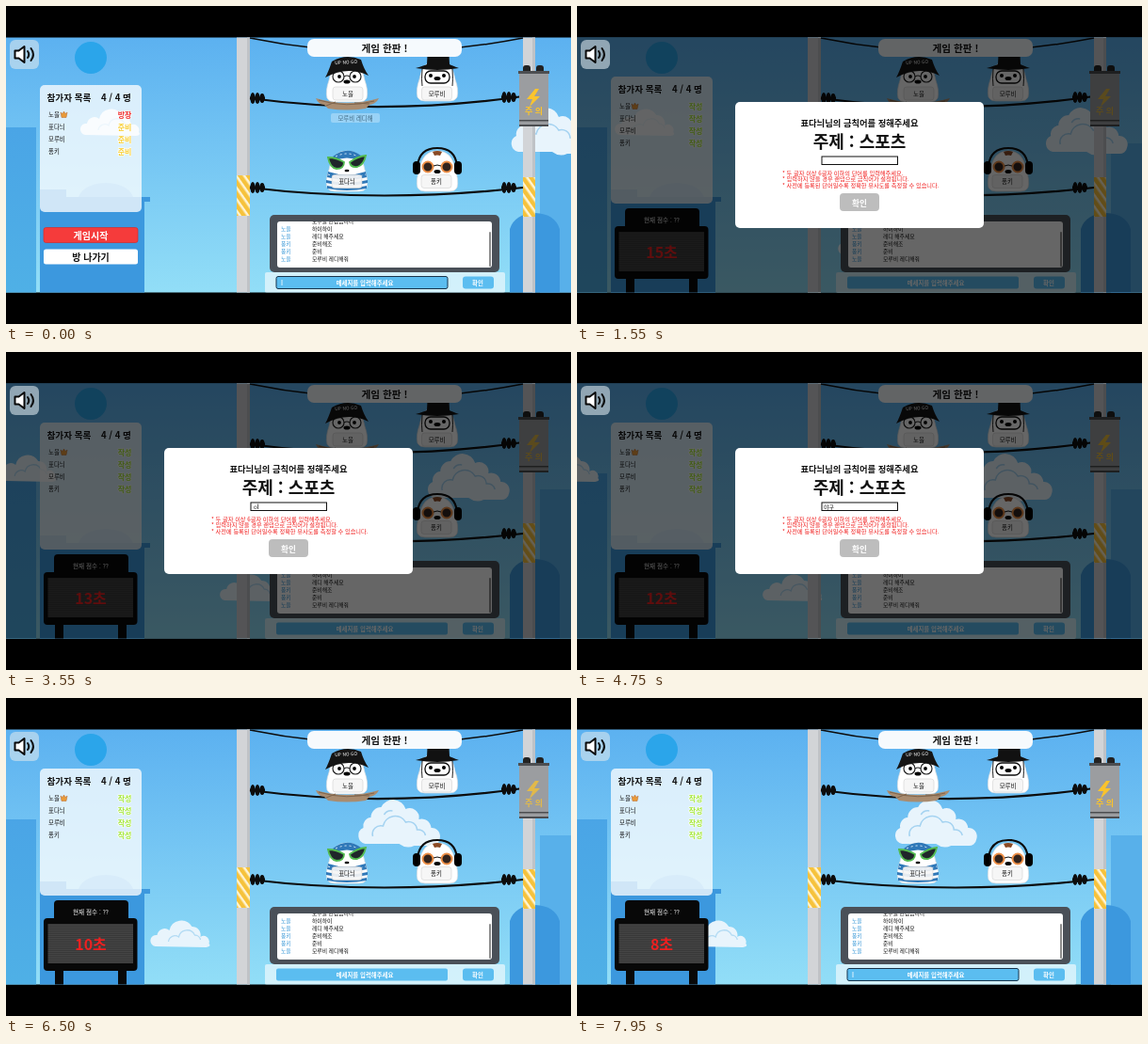
These frames come from a looping animation (600 by 338 pixels, 8000 ms). An HTML page:

```html
<!DOCTYPE html>
<html lang="ko">
<head>
<meta charset="utf-8">
<title>금칙어 게임</title>
<style>
html, body { margin: 0; width: 100%; height: 100%; overflow: hidden; background: #000; }
svg { display: block; width: 100vw; height: 100vh; }
text { font-family: "Noto Sans CJK KR", "Noto Sans CJK", "Noto Sans", sans-serif; font-size: 6.4px; font-weight: 500; fill: #111; dominant-baseline: central; white-space: pre; }
.mid { text-anchor: middle; }
.bold { font-weight: 900; }
.white { fill: #fff; }
.line { fill: none; stroke: #0c0c0c; }
.status { font-size: 8px; font-weight: 900; stroke: #fff; stroke-width: 1.2px; paint-order: stroke; }
.chat text { font-size: 5.8px; }
.chat .who { fill: #2f93d6; }
.note { font-size: 6.2px; fill: #f01818; }
.tag { fill: #f6f6f6; fill-opacity: .92; stroke: #d2d2d2; stroke-width: .6; }
</style>
</head>
<body>
<svg viewBox="0 0 600 338" preserveAspectRatio="none">
  <defs>
    <linearGradient id="sky" x2="0" y2="1">
      <stop stop-color="#5cb1f0"/><stop offset="1" stop-color="#92def7"/>
    </linearGradient>
    <linearGradient id="tower" gradientUnits="userSpaceOnUse" x1="0" x2="0" y1="130" y2="305">
      <stop stop-color="#4aa5e6"/><stop offset="1" stop-color="#4fb0e6"/>
    </linearGradient>
    <pattern id="hazard" width="7" height="7" patternUnits="userSpaceOnUse" patternTransform="rotate(-35)">
      <rect width="7" height="7" fill="#fff4d4"/><rect width="4.5" height="7" fill="#f6c23c"/>
    </pattern>
    <pattern id="scan" width="3" height="2" patternUnits="userSpaceOnUse">
      <rect width="3" height="2" fill="#454545"/><rect width="3" height="1" fill="#383838"/>
    </pattern>
    <clipPath id="stage"><rect y="33.5" width="600" height="271"/></clipPath>
    <clipPath id="log"><rect x="288" y="229" width="228" height="49" rx="3"/></clipPath>
    <g id="bigCloud">
      <path fill="#e8f4fc" d="M-36 20a9 9 0 0 1-2-17a9 9 0 0 1 8-11a11 11 0 0 1 11-11a14 14 0 0 1 26 2a10 10 0 0 1 14 11a10 10 0 0 1 13 9a9 9 0 0 1 9 12a8 8 0 0 1-9 7h-18q-8 4-16-2z"/>
      <path fill="none" stroke="#a5d3f1" stroke-width="1.5" d="M-28 12a9 9 0 0 1 11-11a13 13 0 0 1 24-4a9 9 0 0 1 12 8a8 8 0 0 1 9 6M-16-11a9 9 0 0 1 9-4"/>
    </g>
    <g id="smallCloud">
      <path fill="#e8f4fc" d="M-29 14a6 6 0 0 1 2-12a8 8 0 0 1 13-5a13 13 0 0 1 24-4a9 9 0 0 1 9 11a6 6 0 0 1 9 7q3 3-3 4z"/>
      <path fill="none" stroke="#b3dbf4" stroke-width="1.3" d="M-15 9a7 7 0 0 1 11-5a9 9 0 0 1 17-2a6 6 0 0 1 6 5"/>
    </g>
    <g id="insulator" fill="#0c0c0c">
      <rect x="-8" y="-1.5" width="16" height="3"/>
      <ellipse cx="-5" rx="2.6" ry="6"/><ellipse rx="2.6" ry="6"/><ellipse cx="5" rx="2.6" ry="5"/>
    </g>
    <path id="body" d="M-21 22q-2-8 2-19q3-20 19-20t19 20q4 11 2 19q-2 4-8 4h-26q-6 0-8-4z" fill="#fff" stroke="#d8dde0" stroke-width=".7"/>
  </defs>

  <rect width="600" height="338"/>
  <g clip-path="url(#stage)">
    <rect y="33" width="600" height="272" fill="url(#sky)"/>
    <g fill="url(#tower)">
      <path d="M0 129h32v176H0z"/>
      <path fill="#58b0ea" d="M567 146h33v159h-33z"/>
      <path fill="#5db1e9" d="M76 207q3-18 30-19q27 1 30 19z"/>
      <path fill="#3c98de" d="M36 305V195h28v8h89v5h-6v97z"/>
      <path fill="#3c98de" d="M535 305v-68q5-16 27-17q21 1 26 17v68z"/>
    </g>
    <g id="clouds"></g>

    <g fill="#d2d4d7">
      <path d="M245 33h14v272h-14zM549 33h13v272h-13z"/>
      <path fill="#bfc2c6" d="M256 33h3v272h-3zM559 33h3v272h-3z"/>
      <path fill="url(#hazard)" d="M245 180h14v43h-14zM549 182h13v42h-13z"/>
    </g>
    <path class="line" stroke-width="1.5" d="M259 34Q400 63 549 34"/>
    <path class="line" stroke-width="2.2" d="M259 98Q400 117 549 96M259 193Q400 210 549 193"/>
    <use href="#insulator" x="267" y="98"/><use href="#insulator" x="534" y="97"/>
    <use href="#insulator" x="267" y="193"/><use href="#insulator" x="534" y="193"/>

    <g fill="#222">
      <rect x="549" y="63" width="8" height="9" rx="3"/><rect x="563" y="63" width="8" height="9" rx="3"/>
      <path fill="#9b9da0" d="M545 70h31v57h-31z"/>
      <path d="M544 69h33v3h-33zM545 121h31v1.500h-31zM545 126h31v2h-31z" fill="#4c4e51"/>
      <g id="warning" fill="#fbc42c">
        <path d="M562 88l-9 11h6l-3 8 11-11h-6l5-8z"/>
        <text class="mid bold" x="560.5" y="111" style="font-size:9px;fill:#fbc42c">주 의</text>
      </g>
    </g>

    <g transform="translate(362 76)">
      <use href="#body"/>
      <path fill="#a98c70" d="M-33 22q33 10 67 0q-3 6-10 7l-4 4q-20 3-40 0l-4-4q-7-1-9-7z"/>
      <path stroke="#7f654d" fill="none" d="M-30 24q30 9 59 1M-22 30l10-4M8 27l16 1"/>
      <g fill="#fff" stroke="#222" stroke-width="1.2"><circle cx="-9" cy="-1" r="6"/><circle cx="9" cy="-1" r="6"/><path d="M-3-1q3-2 6 0"/></g>
      <circle cx="-8" cy="-1" r="1.900"/><circle cx="8" cy="-1" r="1.900"/><ellipse cy="4.500" rx="3.500" ry="2"/>
      <path fill="#151515" d="M-23 0q3-5 7-17q15-9 31-2q3 10 8 17q-22-11-46 2z"/>
      <text class="mid white" y="-17" style="font-size:5px" transform="rotate(-3)">UP NO GO</text>
    </g>
    <g transform="translate(458 75)">
      <use href="#body"/>
      <rect class="line" x="-13" y="-6" width="26" height="13" rx="6" stroke-width="1.3"/>
      <circle cx="-7" cy="-1" r="2"/><circle cx="7" cy="-1" r="2"/><ellipse cy="2" rx="3.500" ry="2"/>
      <path fill="#111" d="M-23-9q10-3 12-4l1-20q10-3 22 0l1 20q2 1 10 4q-23 4-46 0z"/>
      <path class="line" stroke-width=".9" d="M-16-8q-1 12 0 18M16-8q1 12 0 18"/>
    </g>
    <g transform="translate(362 171)">
      <use href="#body"/>
      <path fill="#2f78b8" d="M-20 5q20 7 40 0l1 6q-21 6-42 0zM-22 14q22 5 44 0v3q-22 5-44 0zM-21 20q21 5 42 0v3q-21 4-42 0zM-15-11q15-12 30-1l-3 5q-12-5-24 0z"/>
      <path stroke="#dff1fb" fill="none" stroke-dasharray="2 3" d="M-20 8q20 7 40 0M-12-11q12-6 24 0"/>
      <g fill="#20262a" stroke="#53ba50" stroke-width="1.8">
        <path d="M-20-10q9 0 17 5q0 7-8 7q-7-1-9-12zM20-12q-9 1-17 7q1 6 8 5q7-2 9-12z"/>
      </g>
      <ellipse cy="3" rx="4" ry="2.4" fill="#fff"/><ellipse cy="4" rx="2.500" ry="1.3"/>
    </g>
    <g transform="translate(458 171)">
      <use href="#body"/>
      <path fill="#8a4a25" d="M-5-16q5-2 10 0l-2 4q-3-1-6 0z"/>
      <path class="line" stroke-width="2.2" d="M-21-1Q-19-20 0-20T21-1"/>
      <rect x="-26" y="-6" width="8" height="14" rx="4"/><rect x="18" y="-6" width="8" height="14" rx="4"/>
      <g fill="#33241d" stroke="#ef9149" stroke-width="2"><circle cx="-10" cy="0" r="5.500"/><circle cx="10" cy="0" r="5.500"/></g>
      <path class="line" d="M-4-1q4-2 8 0"/><ellipse cy="5" rx="3.500" ry="2"/>
    </g>
    <g id="tags"></g>
    <g id="bubble">
      <rect x="345" y="114" width="52" height="10" rx="2" fill="#fff" opacity=".6"/>
      <text class="mid" x="371" y="119">모루비 레디해</text>
    </g>

    <rect x="320" y="35" width="164" height="19" rx="7" fill="#f6fafd"/>
    <text class="mid bold" x="402" y="44.5" style="font-size:10.6px">게임 한판 !</text>

    <rect x="275" y="283" width="255" height="22" rx="2" fill="#fff" opacity=".6"/>
    <rect x="280" y="222" width="244" height="61" rx="5" fill="#4a5058"/>
    <rect x="288" y="229" width="228" height="49" rx="3" fill="#fff"/>
    <g class="chat" id="chat" clip-path="url(#log)"></g>
    <rect x="513" y="240" width="2" height="37" rx="1" fill="#8c8c8c"/>
    <rect id="field" x="287" y="287.5" width="182" height="13" rx="2" fill="#5bbdf0"/>
    <text class="mid white bold" x="381" y="294">메세지를 입력해주세요</text>
    <path id="chatCaret" d="M293 291v6" stroke="#fff" stroke-width=".8"/>
    <rect x="485" y="287.5" width="33" height="13" rx="3" fill="#5bbdf0"/>
    <text class="mid white bold" x="501" y="294">확인</text>

    <circle cx="90" cy="55" r="17" fill="#2ba5ea"/>

    <g id="roster">
      <rect x="36" y="84" width="108" height="135" rx="5" fill="#fff" opacity=".76"/>
      <text class="bold" x="43.5" y="97" style="font-size:9.6px">참가자 목록</text>
      <text class="bold" x="101" y="97" style="font-size:9.6px">4 / 4 명</text>
      <path fill="#e99a38" stroke="#b7672c" stroke-width=".5" d="M58 113l2 1.5 1.5-2.5 1.5 2.5 2-1.5-1 5.500h-5z"/>
    </g>
    <g id="lobby">
      <rect id="start" x="40" y="235.500" width="100" height="16" rx="2.500" stroke="#d42b2b" stroke-width=".7"/>
      <text class="mid white bold" x="90" y="243.5" style="font-size:10px">게임시작</text>
      <rect x="40" y="258.500" width="100" height="16" rx="2.5" fill="#fff"/>
      <text class="mid bold" x="90" y="266.500" style="font-size:10px">방 나가기</text>
    </g>
    <g id="board">
      <path fill="#080808" d="M52 285h9v20h-9zM119 285h9v20h-9z"/>
      <rect x="51" y="215" width="79" height="24" rx="4" fill="#080808"/>
      <rect x="40" y="234" width="99.500" height="56" rx="4" fill="#080808"/>
      <rect x="44.500" y="240" width="90.500" height="42" fill="url(#scan)"/>
      <text class="mid white" x="90" y="227" style="font-size:6.6px">현재 점수 : ??</text>
      <text class="mid bold" id="count" x="90" y="261" style="font-size:16px;fill:#ef2020"></text>
    </g>

    <rect id="dim" y="33" width="600" height="272" opacity=".6"/>
    <rect x="4" y="36" width="31" height="31" rx="6" fill="#d9e6ed" opacity=".6"/>
    <path fill="#fff" stroke="#080808" stroke-width="2" stroke-linejoin="round" d="M9.500 47.500h4l6-4.500v17l-6-4.500h-4z"/>
    <path class="line" stroke-width="2" stroke-linecap="round" d="M23 48q2.500 3.500 0 7M26.500 45q5 6.500 0 13"/>

    <g id="modal">
      <rect x="168" y="102" width="264" height="134" rx="5" fill="#fff"/>
      <text class="mid bold" x="300" y="124" style="font-size:9.3px">표다늬님의 금칙어를 정해주세요</text>
      <text class="mid bold" x="300" y="143" style="font-size:18px">주제 : 스포츠</text>
      <rect x="260" y="160" width="80.500" height="8.500" fill="#fff" stroke="#111"/>
      <text id="word" x="262" y="164.300" style="font-size:6px"></text>
      <path id="wordCaret" d="M0 161.500v5.500" stroke="#111" stroke-width=".7"/>
      <text class="note" x="218" y="177">* 두 글자 이상 6글자 이하의 단어를 입력해주세요.</text>
      <text class="note" x="218" y="183.5">* 입력하지 않을 경우 랜덤으로 금칙어가 설정됩니다.</text>
      <text class="note" x="218" y="190">* 사전에 등록된 단어일수록 정확한 유사도를 측정할 수 있습니다.</text>
      <rect x="279" y="199" width="42" height="19" rx="4" fill="#bdbdbd"/>
      <text class="mid white bold" x="300" y="208.500" style="font-size:8.600px">확인</text>
    </g>
  </g>
</svg>
<script>
const LOOP = 8000, GAME_START = 1300, COUNT_START = 850, MODAL_END = 5400;
const CLOUD_SPEED = 0.025;
const $ = id => document.getElementById(id);
const add = (parent, tag, attrs, text = '') => {
  const node = document.createElementNS('http://www.w3.org/2000/svg', tag);
  for (const key in attrs) node.setAttribute(key, attrs[key]);
  node.textContent = text;
  return parent.appendChild(node);
};
const show = (id, visible) => $(id).style.display = visible ? '' : 'none';

const players = ['노을', '표다늬', '모루비', '퐁키'];
const statuses = players.map((name, i) => {
  const y = 115 + i * 13.3;
  add($('roster'), 'text', { x: 45, y }, name);
  return add($('roster'), 'text', { x: 126, y, class: 'mid status' });
});

[[363, 93, 0], [457.5, 93, 2], [362, 186.5, 1], [457, 186.5, 3]].forEach(([x, y, i]) => {
  add($('tags'), 'rect', { x: x - 16, y: y - 7, width: 32, height: 14, rx: 3, class: 'tag' });
  add($('tags'), 'text', { x, y, class: 'mid' }, players[i]);
});

[['', '모두들 반갑습니다'], [0, '하이하이'], [0, '레디 해주세요'], [3, '준비해조'], [3, '준비'], [0, '모루비 레디해줘']]
  .forEach(([who, line], i) => {
    const y = 228 + i * 8.1;
    add($('chat'), 'text', { x: 292, y, class: 'who' }, players[who] || '');
    add($('chat'), 'text', { x: 325, y }, line);
  });

const clouds = [['bigCloud', 580, 135], ['smallCloud', 113, 123], ['smallCloud', 350, 250]]
  .map(([shape, x, y]) => ({ x, y, node: add($('clouds'), 'use', { href: '#' + shape }) }));

const typing = [[3500, 'ㅇ'], [3750, '야'], [4000, '약'], [4200, '야구']];

function draw(t) {
  const playing = t >= GAME_START, asking = playing && t < MODAL_END;
  const blink = t % 1000 < 500;
  for (const { x, y, node } of clouds)
    node.setAttribute('transform', `translate(${x - t * CLOUD_SPEED} ${y})`);

  show('lobby', !playing);
  show('board', playing);
  show('dim', asking);
  show('modal', asking);
  $('start').setAttribute('fill', t > 900 ? '#ea2020' : '#f53b3b');
  $('roster').setAttribute('transform', `translate(0 ${playing ? -9 : 0})`);
  statuses.forEach((node, i) => {
    node.textContent = playing ? '작성' : i ? '준비' : '방장';
    node.style.fill = playing ? '#a5e83c' : i ? '#f8cf35' : '#f03434';
  });
  $('count').textContent = 15 - Math.floor((t - COUNT_START) / 1000) + '초';
  $('bubble').setAttribute('opacity', Math.max(0, 0.5 - t * 0.00038));
  $('warning').setAttribute('opacity', 0.87 + 0.13 * Math.cos(t * Math.PI / 500));

  const focused = t < 500 || t >= 7600;
  $('field').setAttribute('stroke', focused ? '#17334a' : 'none');
  show('chatCaret', focused && (blink || t >= 7600));

  const word = typing.filter(([start]) => t >= start).map(step => step[1]).pop() || '';
  $('word').textContent = word;
  $('wordCaret').setAttribute('transform', `translate(${262 + word.length * 5.6} 0)`);
  show('wordCaret', blink || t >= 3500 && t < 4500);
}

function tick() {
  draw(performance.now() % LOOP);
  requestAnimationFrame(tick);
}
tick();
</script>
</body>
</html>
```
